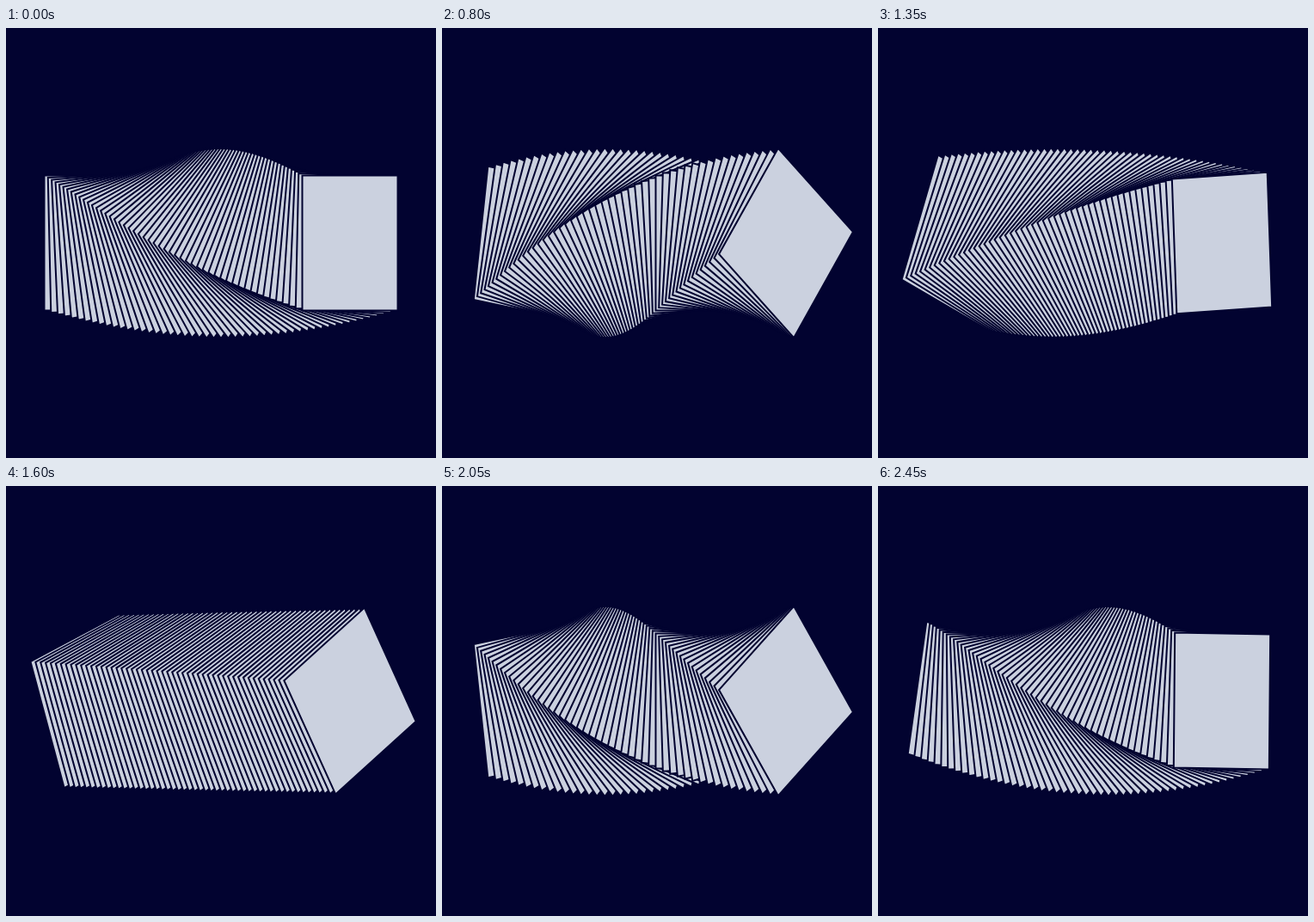
Recreate the animation shown at these times as an HTML page with a canvas. Size 500 by 500 pixels, loop 2.5 s.

```html
<!DOCTYPE html>
<html lang="en">
<head>
<meta charset="utf-8">
<title>Twisting ribbon</title>
<style>
  html, body { margin: 0; width: 100%; height: 100%; overflow: hidden; background: #020330; }
  canvas { display: block; }
</style>
</head>
<body>
<canvas id="stage" width="500" height="500"></canvas>
<script>
const ctx = document.getElementById('stage').getContext('2d');
const LOOP = 2500, STEP = 50;
const COUNT = 51, FIRST_X = 100, GAP = 6, MID_Y = 250;
const RX = 78.5, RY = 111;
const INK = '#020330', PAPER = '#cbd1df';

// Four points a quarter turn apart on an ellipse.
function card(x, angle) {
  ctx.beginPath();
  for (let k = 0; k < 4; k++) {
    const a = angle + Math.PI / 4 + k * Math.PI / 2;
    ctx.lineTo(x + RX * Math.cos(a), MID_Y + RY * Math.sin(a));
  }
  ctx.closePath();
  ctx.fill();
  ctx.stroke();
}

function draw(time) {
  const phase = Math.floor(time % LOOP / STEP) * STEP / LOOP * 2 * Math.PI;
  const start = -Math.PI / 2 * Math.sin(phase);
  const end = -Math.PI / 2 * Math.cos(phase);

  ctx.fillStyle = INK;
  ctx.fillRect(0, 0, 500, 500);
  ctx.fillStyle = PAPER;
  ctx.strokeStyle = INK;
  ctx.lineWidth = 2;
  for (let i = 0; i < COUNT; i++) {
    card(FIRST_X + i * GAP, start + (end - start) * i / (COUNT - 1));
  }
}

function tick() {
  draw(performance.now());
  requestAnimationFrame(tick);
}
tick();
</script>
</body>
</html>
```
